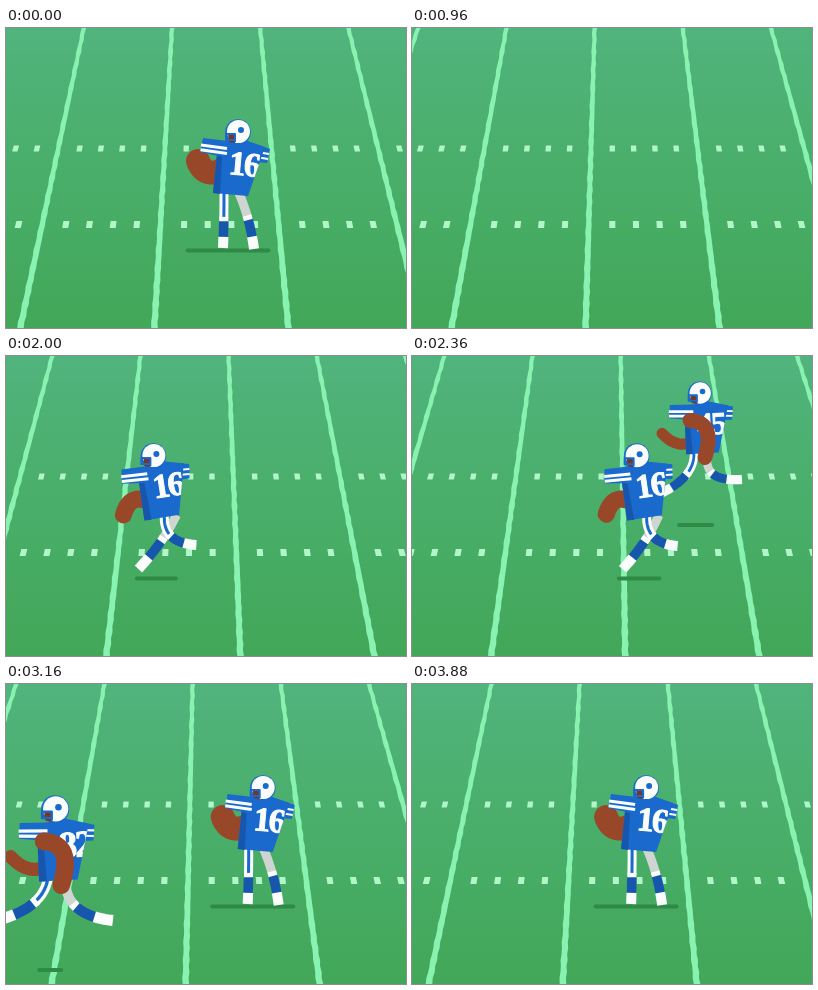
These frames come from a looping animation (400x300 px, 3.96 s). An HTML page with a canvas:

```html
<!DOCTYPE html>
<html lang="en">
<head>
<meta charset="utf-8">
<title>Football drill</title>
<style>
  html, body { margin: 0; width: 100%; height: 100%; overflow: hidden; background: #48ad68; }
  canvas { display: block; width: 400px; height: 300px; }
</style>
</head>
<body>
<canvas id="stage" width="400" height="300"></canvas>
<script>
const ctx = document.getElementById('stage').getContext('2d');
const LOOP = 3960, STEP = 40;
const BLUE = '#1a69cc', NAVY = '#1657ad', WHITE = '#fbfdfc', GREY = '#cfd5d1';
const SKIN = '#984829', FACE = '#7b3522', SHADE = '#2f8a46';
const SPACING = 88.2, DEPTH = 0.52;

// Smooth monotone curve through [time, value] keys
function curve(keys) {
  const slope = i => (keys[i + 1][1] - keys[i][1]) / (keys[i + 1][0] - keys[i][0]);
  const tangents = keys.map((_, i) => {
    if (i === 0 || i === keys.length - 1) return 0;
    const a = slope(i - 1), b = slope(i);
    return a * b <= 0 ? 0 : 2 * a * b / (a + b);
  });
  return t => {
    if (t <= keys[0][0]) return keys[0][1];
    const i = keys.findIndex((k, n) => n < keys.length - 1 && t <= keys[n + 1][0]);
    if (i < 0) return keys[keys.length - 1][1];
    const [t0, a] = keys[i], [t1, b] = keys[i + 1];
    const d = t1 - t0, s = (t - t0) / d, r = 1 - s;
    return a * (1 + 2 * s) * r * r + b * s * s * (3 - 2 * s)
      + d * s * r * (tangents[i] * r - tangents[i + 1] * s);
  };
}

const camera = curve([[0, 0], [960, -248], [1560, -501], [2000, -649],
  [2680, -671], [3160, -685], [3880, -704], [3960, -705.6]]);
const passerTrack = curve([[1560, 1052], [2000, 1046], [2600, 1197], [3160, 1202], [3960, 1205.7]]);

const mix = (a, b, s) => a + (b - a) * s;
const smooth = s => s * s * (3 - 2 * s);

function polygon(color, points) {
  ctx.fillStyle = color;
  ctx.beginPath();
  points.forEach(([x, y]) => ctx.lineTo(x, y));
  ctx.fill();
}

function disc(color, x, y, rx, ry = rx, angle = 0) {
  ctx.fillStyle = color;
  ctx.beginPath();
  ctx.ellipse(x, y, rx, ry, angle, 0, Math.PI * 2);
  ctx.fill();
}

function stroke(color, width, points, cap = 'butt') {
  ctx.strokeStyle = color;
  ctx.lineWidth = width;
  ctx.lineCap = cap;
  ctx.lineJoin = 'round';
  ctx.beginPath();
  points.forEach(([x, y]) => ctx.lineTo(x, y));
  ctx.stroke();
}

// Part of a quadratic bend [x0, y0, cx, cy, x1, y1]
function bend(color, width, b, from = 0, to = 1, cap = 'butt') {
  const points = [];
  for (let i = 0; i <= 12; i++) {
    const s = mix(from, to, i / 12), r = 1 - s;
    points.push([0, 1].map(k => r * r * b[k] + 2 * r * s * b[k + 2] + s * s * b[k + 4]));
  }
  stroke(color, width, points, cap);
}

function leg(b, striped) {
  bend(striped ? WHITE : GREY, 9, b, 0, 0.46);
  if (striped) bend(BLUE, 3, b, 0, 0.46);
  bend(WHITE, 9, b, 0.42, 0.52);
  bend(NAVY, 9.5, b, 0.5, 0.8);
  bend(WHITE, 10, b, 0.79, 1);
}

function arm(b, width) {
  bend(SKIN, width, b, 0, 1, 'round');
}

function shadow(x, y, width) {
  stroke(SHADE, 4, [[x - width / 2 + 2, y], [x + width / 2 - 2, y]], 'round');
}

function helmet(x, y) {
  ctx.save();
  ctx.translate(x, y);
  disc(BLUE, 0, 0, 12.8);
  disc(WHITE, 0.5, -0.5, 11.5);
  polygon(FACE, [[-10, 2], [-3, 2], [-3, 11], [-9, 10]]);
  stroke(BLUE, 2, [[-3, 10], [-3, 2], [-12, 2], [-12, 8], [-4, 8]]);
  disc(BLUE, 3, -2, 3);
  ctx.restore();
}

// Shirt around the middle of its hem
function jersey(number, angle, shift = 0) {
  ctx.save();
  ctx.rotate(angle * Math.PI / 180);
  polygon(BLUE, [[33, -48], [39, -46], [36, -32], [26, -33]]);
  stroke(WHITE, 2, [[29, -42.5], [38, -41]]);
  stroke(WHITE, 2, [[28, -37.5], [37, -36]]);
  const torso = [[-5, -54], [14, -55], [34, -48], [17, 1], [-18, -2], [-14, -42]];
  polygon(BLUE, torso);
  polygon(NAVY, [[-14, -40], [-9, -38], [-11, -1], [-18, -2]]);
  ctx.save();
  ctx.clip();
  ctx.beginPath();
  torso.forEach(([x, y]) => ctx.lineTo(x, y));
  ctx.restore();
  ctx.save();
  ctx.beginPath();
  torso.forEach(([x, y]) => ctx.lineTo(x, y));
  ctx.clip();
  ctx.translate(13 + shift, -31);
  ctx.rotate(0.09);
  ctx.font = 'bold 34px "Liberation Serif", serif';
  ctx.letterSpacing = '-2px';
  ctx.textAlign = 'center';
  ctx.textBaseline = 'alphabetic';
  ctx.fillStyle = ctx.strokeStyle = WHITE;
  ctx.lineWidth = 1;
  ctx.fillText(number, 0, 11.5);
  ctx.strokeText(number, 0, 11.5);
  ctx.restore();
  polygon(BLUE, [[-28, -57], [-3, -54], [-3, -37], [-31, -43]]);
  stroke(WHITE, 3, [[-30, -50], [-4, -46.5]]);
  stroke(WHITE, 3, [[-30.5, -45.3], [-4, -41.5]]);
  ctx.restore();
}

function field(scroll) {
  const grass = ctx.createLinearGradient(0, 0, 0, 300);
  grass.addColorStop(0, '#50b47d');
  grass.addColorStop(0.5, '#49ae69');
  grass.addColorStop(1, '#42a758');
  ctx.fillStyle = grass;
  ctx.fillRect(0, 0, 400, 300);

  const project = (x, y) => 200 + (x - 200) * (1 + DEPTH * y / 300);
  const mark = (x, width, top, bottom, color) => polygon(color, [
    [project(x - width / 2, top), top], [project(x + width / 2, top), top],
    [project(x + width / 2, bottom), bottom], [project(x - width / 2, bottom), bottom]]);

  const first = ((166 + scroll) % SPACING + SPACING) % SPACING - SPACING;
  for (let i = 0; i < 7; i++) {
    const x = first + i * SPACING, left = [], right = [];
    for (let y = 0; y <= 300; y += 6) {
      left.push([project(x - 2.1, y) + 0.4 * Math.sin(y * 0.7), y]);
      right.unshift([project(x + 2.1, y) + 0.4 * Math.sin(y * 0.5 + 2), y]);
    }
    polygon('#88f2b0', left.concat(right));
    for (let k = 1; k < 5; k++) {
      const hash = x + k * SPACING / 5;
      mark(hash, 4.4, 117.5, 123.5, '#b0f6c8');
      mark(hash, 4.5, 193, 200, '#b0f6c8');
    }
  }
}

// Hem x, y, tilt | head | arm bend, width | striped leg | grey leg | shadow centre, width
const POSES = {
  stand: [-7, -54, 0, 0, -117, -18, -78, -34, -72, -40, -88, 24,
    -14, -56, -14, -27, -15, -1, 1, -56, 12, -30, 16, 0, -10, 85],
  crouch: [23, -38, -33, -9, -88, 0, -38, -16, -38, -32, -26, 18,
    6, -44, -6, -24, -7, 1, 20, -44, 26, -22, 25, 0, 0, 78],
  hop: [6, -59, -14, -3, -121, -5, -74, -26, -86, -33, -62, 17,
    8, -62, 6, -34, 40, -32, 20, -62, 8, -36, -18, -8, 0, 43]
};
const POSE_KEYS = [[0, 'stand'], [920, 'stand'], [960, 'crouch'], [1640, 'crouch'],
  [1940, 'hop'], [2040, 'hop'], [2200, 'stand'], [2340, 'hop'], [2520, 'stand'], [LOOP, 'stand']];

function poseAt(t) {
  const i = POSE_KEYS.findIndex((k, n) => t < POSE_KEYS[n + 1][0]);
  const [t0, from] = POSE_KEYS[i], [t1, to] = POSE_KEYS[i + 1];
  const s = smooth((t - t0) / (t1 - t0));
  return POSES[from].map((v, n) => mix(v, POSES[to][n], s));
}

function passer(t) {
  const x = (t < 960 ? 232 : passerTrack(t)) + camera(t) * 1.38;
  if (x < -80 || x > 480) return;
  const p = poseAt(t);
  ctx.save();
  ctx.translate(x, 221);
  shadow(p[24], 1.5, p[25]);
  leg(p.slice(18, 24), false);
  leg(p.slice(12, 18), true);
  if (t >= 960 && t < 1760) {
    const lift = smooth(Math.max(0, (t - 1640) / 120));
    disc(SKIN, -36, -5 - 20 * lift, 12, 6, -0.1);
  }
  arm(p.slice(5, 11), p[11]);
  ctx.save();
  ctx.translate(p[0], p[1]);
  jersey('16', p[2]);
  ctx.restore();
  helmet(p[3], p[4]);
  ctx.restore();
}

function runner(t, { number, x, ground, scale, phase, shift }) {
  const left = x - 0.5875 * (t - 2680);
  if (left < -110 || left > 500) return;
  const turn = 2 * Math.PI * ((t - 2680) / 480 + phase);
  const reach = Math.max(0, -Math.sin(turn));
  const air = Math.cos(2 * turn);
  const limb = (hip, a) => [hip, -3,
    -5 + 12 * Math.sin(a) - 9 * Math.cos(a), 28 - 3 * Math.cos(a),
    -4 - 53 * Math.cos(a), 36 + 17 * Math.sin(a)];
  const swing = (a, b) => a.map((v, i) => mix(v, b[i], reach));

  ctx.save();
  ctx.translate(left, ground);
  shadow(-8 * scale, 0, 48 - 22 * air);
  ctx.scale(scale, scale);
  ctx.translate(0, -72 - 9 * air);
  arm(swing([0, -20, -24, 0, -44, -22], [27, -38, 34, -8, 29, 14]), 12);
  leg(limb(6, turn + Math.PI), false);
  leg(limb(-10, turn), true);
  jersey(number, -8, shift);
  arm(swing([-14, -36, 14, -34, 2, 4], [-22, -24, -42, 2, -67, -24]), mix(16, 12, reach));
  helmet(-3.5, -65);
  ctx.restore();
}

const FAR = { number: '45', x: 103, ground: 169, scale: 0.93, phase: 0.75, shift: 0 };
const NEAR = { number: '82', x: 335, ground: 286, scale: 1.1, phase: 0, shift: 6 };

function draw(now) {
  const t = Math.min(Math.floor(now % LOOP / STEP) * STEP, LOOP - 2 * STEP);
  field(camera(t));
  runner(t, FAR);
  passer(t);
  runner(t, NEAR);
}

const start = performance.now();
function tick() {
  draw(performance.now() - start);
  requestAnimationFrame(tick);
}
tick();
</script>
</body>
</html>
```
